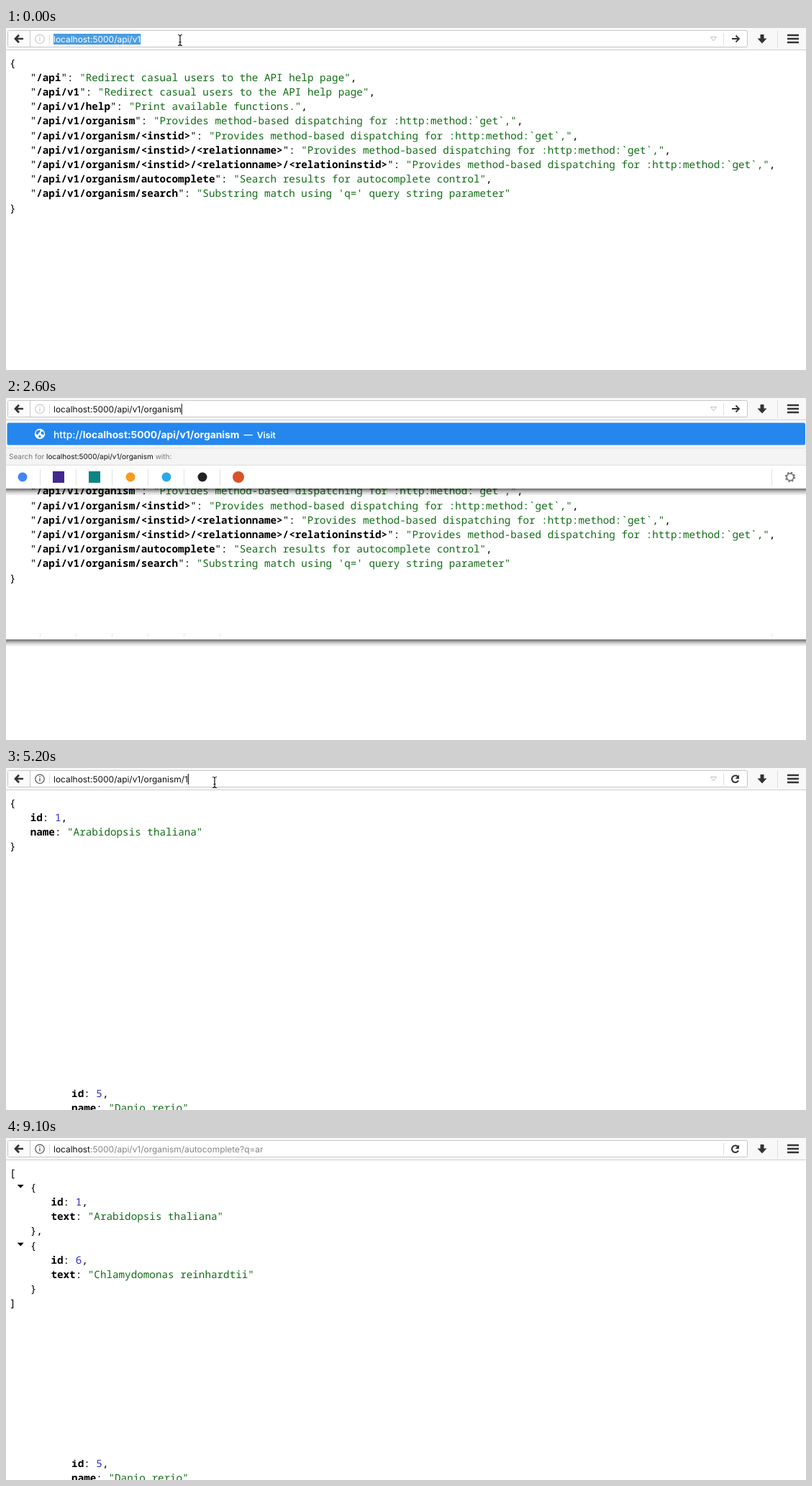
An HTML page for the animation above (9.6 s loop, 1112x476 px).

```html
<!DOCTYPE html>
<html lang="en">
<head>
<meta charset="utf-8">
<title>API browsing</title>
<style>
  html, body { margin: 0; width: 100%; height: 100%; overflow: hidden; background: #fff; }
  svg { display: block; width: 1112px; height: 476px; }
  text { white-space: pre; text-rendering: geometricPrecision; font-family: Inter, "Open Sans", sans-serif; }
  .json { font: 14.28px "Noto Sans Mono", "DejaVu Sans Mono", monospace; }
  .url { font-size: 11.95px; }
  .title { font-size: 13.85px; }
  .hint { font-size: 10px; }
  .small { font-size: 12px; }
  .bold, .key { font-weight: 700; }
  .visit { font-size: 12.2px; font-weight: 600; }
</style>
</head>
<body>
<svg id="stage" viewBox="0 0 1112 476" xmlns="http://www.w3.org/2000/svg"></svg>
<script>
const LOOP = 9600;
const HOST = 'localhost';
const ROOT = ':5000/api/v1';
const stage = document.getElementById('stage');

const esc = s => s.replace(/&/g, '&amp;').replace(/</g, '&lt;');
const span = (s, attrs) => `<tspan ${attrs}>${esc(s)}</tspan>`;
const rect = (x, y, w, h, fill, extra = '') =>
  `<rect x="${x}" y="${y}" width="${w}" height="${h}" fill="${fill}" ${extra}/>`;
const line = (d, stroke, width = 1) =>
  `<path d="${d}" fill="none" stroke="${stroke}" stroke-width="${width}"/>`;
const clip = (id, body) => `<g clip-path="url(#${id})">${body}</g>`;

const defs = `<defs>
  <linearGradient id="shade" x1="0" y1="0" x2="0" y2="1">
    <stop offset="0" stop-color="#000" stop-opacity=".58"/>
    <stop offset=".5" stop-color="#000" stop-opacity=".2"/>
    <stop offset="1" stop-color="#000" stop-opacity="0"/>
  </linearGradient>
  <clipPath id="below8">${rect(0, 328, 1112, 20, '#000')}</clipPath>
  <clipPath id="below2">${rect(0, 142, 1112, 26, '#000')}</clipPath>
  <clipPath id="tail">${rect(0, 448, 1112, 28, '#000')}</clipPath>
</defs>`;

// JSON pages: each line is [indent level, markup, has a fold arrow]
const quoted = s => span(`"${s}"`, 'fill="#116b16"');
const number = n => span(String(n), 'fill="#2d2dc4"');
const field = (name, value) => span(name, 'class="key"') + ': ' + value;

const dispatch = 'Provides method-based dispatching for :http:method:`get`,';
const endpoints = [
  ['/api', 'Redirect casual users to the API help page'],
  ['/api/v1', 'Redirect casual users to the API help page'],
  ['/api/v1/help', 'Print available functions.'],
  ['/api/v1/organism', dispatch],
  ['/api/v1/organism/<instid>', dispatch],
  ['/api/v1/organism/<instid>/<relationname>', dispatch],
  ['/api/v1/organism/<instid>/<relationname>/<relationinstid>', dispatch],
  ['/api/v1/organism/autocomplete', 'Search results for autocomplete control'],
  ['/api/v1/organism/search', "Substring match using 'q=' query string parameter"]
];
const species = ['Arabidopsis thaliana', 'Oryza sativa', 'Microtus californicus',
  'Drosophila melanogaster', 'Danio rerio'];

const record = (level, id, label, name, end) => [
  [level, '{', level > 0],
  [level + 1, field('id', number(id)) + ','],
  [level + 1, field(label, quoted(name))],
  [level, end]
];

const pages = {
  help: [
    [0, '{'],
    ...endpoints.map(([path, text], i) => [1,
      `"${span(path, 'class="key"')}": ${quoted(text)}${i < endpoints.length - 1 ? ',' : ''}`]),
    [0, '}']
  ],
  list: [
    [0, '{'],
    [1, field('num_results', number(7)) + ','],
    [1, field('objects', '['), true],
    ...species.flatMap((name, i) => record(2, i + 1, 'name', name, '},'))
  ],
  single: record(0, 1, 'name', species[0], '}'),
  matches: [
    [0, '['],
    ...record(1, 1, 'text', species[0], '},'),
    ...record(1, 6, 'text', 'Chlamydomonas reinhardtii', '}'),
    [0, ']']
  ]
};

function drawPage(name) {
  return pages[name].map(([level, markup, fold], i) => {
    const x = 5 + level * 28.7, y = 53.6 + i * 20.2;
    const arrow = fold ? `<path d="M${x - 18} ${y - 8.8}h9l-4.5 4.8z"/>` : '';
    return `${arrow}<text class="json" x="${x}" y="${y}">${markup}</text>`;
  }).join('');
}

// Address suggestions: [title or null for the address, path, icon]
const history = [
  ['404 Not Found', 'organism', 'globe'],
  [null, 'help', 'globe'],
  [null, '', 'globe'],
  ['404 Not Found', 'ps/', 'terminal'],
  [null, 'organism/search?q=ar', 'globe'],
  [null, 'ps/1/', 'terminal'],
  ['localhost', 'ps/1/name', 'globe']
];

const globe = (y, color, land) => `<g transform="translate(47 ${y})">
  <circle r="7.2" fill="${color}"/>
  <path d="M-4.5-4.2L-.5-5.6L.8-3.6L-1.8-1L-3.2 1.4L-5.8-.6zM2.2-3L5-3.4L6 .4L3.6 1.2L1.4-.8zM-1.6 1.8L1.8 2.4L.8 5.6L-1.6 4.6z" fill="${land}"/></g>`;
const terminal = y => rect(39.5, y - 6.5, 15, 13, '#23272e', 'stroke="#8b929b"') +
  line(`M42 ${y - 3}l2.5 2l-2.5 2M46 ${y + 1.5}h3`, '#eee');

function suggestion([title, path, icon], i, match) {
  const y = 81 + i * 30;
  const address = 'localhost:5000/api/v1/' + path;
  const cut = 'localhost:5000/api/v1/'.length + (path.startsWith(match) ? match.length : 0);
  const split = span(address.slice(0, cut), 'class="bold"') + esc(address.slice(cut));
  return (icon === 'globe' ? globe(y - 1, '#858585', '#f4f4f4') : terminal(y - 1)) +
    `<text class="title" x="66" y="${y + 5}">${title || 'http://' + split}` +
    `<tspan class="small" fill="#777" dx="6">—</tspan>` +
    `<tspan class="small" fill="#2f76cc" dx="6">${split}</tspan></text>`;
}

function engineIcon([shape, color], i, y) {
  const x = 23 + i * 50;
  return shape === 'square' ? rect(x - 8, y - 8, 16, 16, color)
    : `<circle cx="${x}" cy="${y}" r="${shape === 'dot' ? 6.5 : 8}" fill="${color}"/>`;
}
const engines = [['dot', '#4285f4'], ['square', '#42298f'], ['square', '#0c8484'],
  ['dot', '#f79a1e'], ['dot', '#2ca7e8'], ['dot', '#222'], ['circle', '#d9532c']];

function drawDropdown(rows, path) {
  const base = 39 + rows * 30, bottom = base + 57, iconY = base + 41;
  const address = HOST + ROOT + path;
  const listed = rows === 8 ? history : rows === 2 ? [history[4]] : [];
  const match = rows === 2 ? 'organism/' : '';
  const marks = [47.5, 97.5, 147.5, 197.5, 247.5, 297.5, 1064.5]
    .map(x => `M${x} ${base + 30}v23`).join('');
  return rect(0, bottom, 1112, 10, 'url(#shade)') +
    rect(0, 31, 1112, bottom - 31, '#fff') +
    rect(1.5, 34.5, 1109.5, 31, '#2587ed', 'rx="2"') +
    globe(50, '#fff', '#2587ed') +
    `<text class="title" x="66" y="56" fill="#fff"><tspan font-weight="500">http://</tspan>` +
    span(address, 'class="bold"') +
    `<tspan class="visit" dx="6">—</tspan><tspan class="visit" dx="6">Visit</tspan></text>` +
    listed.map((item, i) => suggestion(item, i, match)).join('') +
    rect(0, base, 1112, 24.5, '#f4f4f5') +
    line(`M0 ${base + .5}H1112M0 ${base + 24.5}H1112`, '#dedede') +
    `<text class="hint" x="4" y="${base + 16}" fill="#777">Search for ${span(address, 'fill="#111"')} with:</text>` +
    line(marks, '#e2e2e2') +
    engines.map((e, i) => engineIcon(e, i, iconY)).join('') +
    `<g transform="translate(1090 ${iconY})" fill="none" stroke="#777"><circle r="4.8" stroke-width="1.8"/>` +
    `<circle r="6.3" stroke-width="1.8" stroke-dasharray="2.5 2.45"/></g>`;
}

function drawToolbar({ path, loaded, mode }) {
  const info = loaded ? '#555' : '#c9c9c9';
  const rest = mode === 'idle' ? '#858585' : '#111';
  const action = loaded
    ? line('M1017.6 12.4A4.8 4.8 0 1 0 1018 17.6', '#333', 2) + '<path d="M1019 9.6v5.4h-5.4z" fill="#333"/>'
    : line('M1009 15h9M1014.5 10.5l4.5 4.5l-4.5 4.5', '#333', 1.9);
  return rect(0, 0, 1112, 30, '#f8f8f9') +
    line('M0 30.5H1112', '#cfcfcf') +
    rect(2.5, 3.5, 1028, 23, '#fff', 'rx="2" stroke="#c6c6c6"') +
    rect(3, 4, 30, 22, '#fbfbfb') +
    line('M33.5 4v22', '#c6c6c6') +
    line('M60.5 9v13M997.5 7v17M1072.5 3v25', '#dedede') +
    line('M13.5 15H24M18 9.8L13 15L18 20.2', '#333', 2.7) +
    `<circle cx="47" cy="15.3" r="6.2" fill="none" stroke="${info}" stroke-width="1.2"/>` +
    line('M47 14.2v4.3M47 11.5v1.5', info, 1.4) +
    (mode === 'idle' ? '' : line('M979.5 12.5h8l-4 5.5z', '#c2c2c2')) +
    action +
    '<path d="M1048.5 9h5v5.5h4l-6.5 7l-6.5-7h4z" fill="#333"/>' +
    line('M1086 10h16M1086 15h16M1086 20h16', '#333', 2.5) +
    '<g id="marker"></g>' +
    `<text id="url" class="url" x="66" y="19.8" fill="${mode === 'select' ? '#fff' : '#111'}">${HOST}` +
    span(ROOT + path, mode === 'select' ? '' : `fill="${rest}"`) + '</text>';
}

function drawMouse([x, y]) {
  const d = `M${x - 3} ${y - 7.5}q3 0 3 2v11q0 2-3 2M${x + 3} ${y - 7.5}q-3 0-3 2v11q0 2 3 2M${x - 1.5} ${y + 2.5}h3`;
  return line(d, '#fff', 2.6) + line(d, '#111', 1.2);
}

function draw(state) {
  let body = defs + rect(0, 0, 1112, 476, '#fff') + drawPage(state.page);
  if (state.tail) body += clip('tail', drawPage('list'));
  if (state.ghost) body += clip('below' + state.ghost, drawDropdown(state.ghost, ''));
  if (state.rows) body += drawDropdown(state.rows, state.path);
  body += drawToolbar(state);
  if (state.mouse) body += drawMouse(state.mouse);
  stage.innerHTML = body;

  const width = document.getElementById('url').getComputedTextLength();
  const marker = document.getElementById('marker');
  if (state.mode === 'select') marker.innerHTML = rect(66, 8, width, 15, '#4a9de0');
  if (state.mode === 'edit') marker.innerHTML = rect(66 + width, 8, 1, 15, '#000');
}

// Timeline: each entry changes part of the state
const steps = [];
const at = (time, change) => steps.push({ time, state: { ...steps.at(-1)?.state, ...change } });
const type = (prefix, text, times) =>
  times.forEach((time, i) => at(time, { path: prefix + text.slice(0, i + 1) }));
const load = (time, page, change) =>
  at(time, { page, loaded: true, mode: 'idle', rows: 0, ghost: 0, mouse: null, ...change });

at(0, { page: 'help', path: '', loaded: false, mode: 'select', rows: 0, ghost: 0, tail: false, mouse: [242, 17] });
at(300, { mode: 'edit' });
at(600, { path: '/', rows: 8, mouse: null });
type('/', 'or', [900, 1100]);
at(1200, { path: '/org' });
at(1400, { rows: 1, ghost: 8 });
type('/org', 'anism', [1400, 1500, 1600, 1800, 1900]);
load(2700, 'list');
at(2900, { mouse: [259, 18] });
at(3000, { mode: 'select' });
at(3400, { mode: 'edit' });
at(3600, { path: '/organism/', rows: 2, loaded: false, mouse: null });
at(3900, { path: '/organism/1', rows: 1 });
load(4500, 'single', { tail: true });
at(5100, { mode: 'edit', mouse: [290, 20] });
at(5400, { path: '/organism/', rows: 2, loaded: false, mouse: null });
at(5500, { path: '/organism/a' });
at(5600, { rows: 1, ghost: 2 });
type('/organism/a', 'utocomplete?q=a', [5600, 5700, 5800, 5900, 6000,
  6100, 6300, 6400, 6500, 6600, 6700, 7000, 7200, 7500, 7900]);
at(8100, { path: '/organism/autocomplete?q=ar' });
load(8600, 'matches');

let shown = null;
const start = performance.now();
function tick() {
  const time = (performance.now() - start) % LOOP;
  const step = steps.findLast(s => s.time <= time) || steps[0];
  if (step !== shown) draw((shown = step).state);
  requestAnimationFrame(tick);
}
tick();
</script>
</body>
</html>
```
